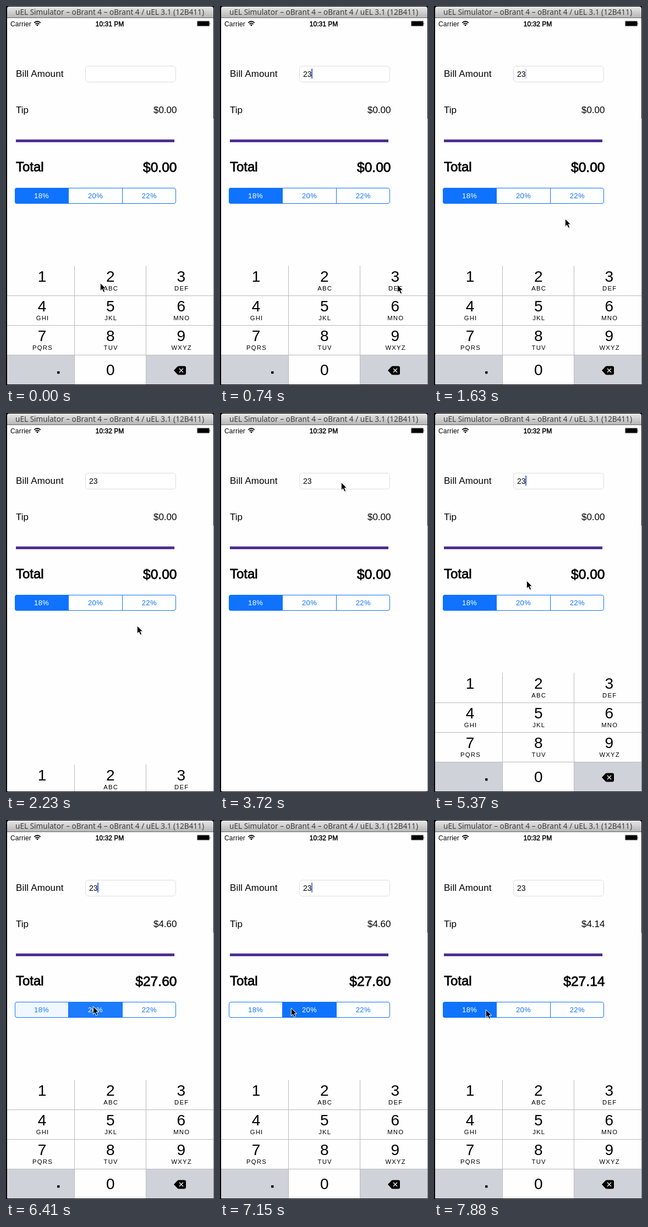
An HTML page for the animation above (8000 ms loop, 378 px wide and 690 px high).

```html
<!DOCTYPE html>
<html lang="en">
<head>
<meta charset="utf-8">
<title>Tip calculator</title>
<style>
html, body { margin: 0; width: 100%; height: 100%; overflow: hidden; background: #000; }
svg { display: block; width: 378px; height: 690px; font-family: "Liberation Sans", Arial, sans-serif; }
.mid { text-anchor: middle; }
.end { text-anchor: end; }
.label { font-size: 17px; }
.total { font-size: 24.6px; stroke: #000; stroke-width: .8px; }
.seg { font-size: 13px; letter-spacing: .4px; }
.digit { font-size: 28px; }
.abc { font-size: 11.3px; letter-spacing: 1.2px; }
</style>
</head>
<body>
<svg viewBox="0 0 378 690">
  <defs>
    <linearGradient id="bar" x2="0" y2="1">
      <stop stop-color="#e8e8e8"/><stop offset="1" stop-color="#b4b4b4"/>
    </linearGradient>
    <clipPath id="screen"><path d="M2 21H377V687Q377 689 375 689H4Q2 689 2 687Z"/></clipPath>
    <clipPath id="pill"><rect x="16" y="331" width="293" height="29" rx="4"/></clipPath>
  </defs>
  <rect x="377" y="205" width="1" height="485" fill="#777"/>
  <path d="M2 22V5Q2 1 6 1H373Q377 1 377 5V22Z" fill="url(#bar)"/>
  <text x="188.5" y="16" class="mid" fill="#3c3c3c" style="font:13.6px 'Noto Sans','Open Sans',sans-serif">uEL Simulator – oBrant 4 – oBrant 4 / uEL 3.1 (12B411)</text>

  <g clip-path="url(#screen)">
    <rect y="22" width="378" height="668" fill="#fefefe"/>
    <path d="M2 21.5H377" stroke="#666"/>
    <text x="8" y="37" font-size="12" letter-spacing=".2">Carrier</text>
    <g fill="none" stroke="#000" stroke-width="1.8">
      <path d="M51.2 30.6Q57 25.4 62.8 30.6M53.4 33Q57 29.8 60.6 33"/>
      <path d="M55 34.4Q57 32.8 59 34.4L57 36.7Z" fill="#000" stroke="none"/>
    </g>
    <text id="clock" x="188.5" y="37" class="mid" font-size="12" stroke="#000" stroke-width=".45"></text>
    <rect x="347.3" y="27.3" width="22.4" height="9.4" rx="1.5" fill="none" stroke="#000" stroke-width=".5"/>
    <rect x="348" y="28" width="21" height="8" rx=".5"/>
    <path d="M370.3 30.3Q372 32.2 370.3 34.3Z"/>

    <text x="18" y="128.7" class="label" letter-spacing=".15">Bill Amount</text>
    <rect x="144.5" y="109.5" width="164" height="29" rx="5" fill="#fff" stroke="#dcdcdc"/>
    <text id="bill" x="151" y="129" font-size="14"></text>
    <rect id="caret" y="114" width="2" height="18" fill="#4468e8"/>
    <text x="18" y="195" class="label">Tip</text>
    <text id="tip" x="310.5" y="195" class="label end"></text>
    <rect x="18" y="243" width="288" height="5" fill="#4e2f90"/>
    <text x="18" y="301" class="total" style="font-size:24px">Total</text>
    <text id="total" x="310.5" y="302" class="total end"></text>

    <g id="segments" clip-path="url(#pill)"></g>
    <path d="M113.5 331V360M211.5 331V360" stroke="#0f73ff"/>
    <rect x="16.5" y="331.5" width="292" height="28" rx="3.5" fill="none" stroke="#0f73ff"/>

    <g id="pad"></g>
  </g>
  <g id="cursor">
    <path d="M1 2V16L4.2 13L6.6 18.4L9.2 17.3L6.8 12H11Z" opacity=".2"/>
    <path d="M.3 .3V14.6L3.6 11.6L5.9 17L8.6 15.8L6.3 10.6H10.6Z" stroke="#fff"/>
  </g>
</svg>
<script>
const $ = id => document.getElementById(id);
const LOOP = 8000, TICK = 148.8, BLUE = '#0f73ff', GREY = '#d0d2d9';
const LETTERS = ['', 'ABC', 'DEF', 'GHI', 'JKL', 'MNO', 'PQRS', 'TUV', 'WXYZ'];
const COLUMNS = [[2, 122.5, 65.5], [125, 129, 189.7], [255, 122, 318.2]];  // left, width, centre

// [tick, x, y] stops of the pointer
const PATH = [
  [0, 171, 504], [2, 171, 504], [3, 245, 510], [4, 320, 507], [5, 322, 507],
  [6, 302, 552], [7, 262, 455], [8, 238, 387], [15, 238, 387], [17, 242, 402],
  [20, 242, 402], [21, 240, 385], [23, 226, 225], [24, 215, 150], [25, 220, 126],
  [34, 220, 126], [35, 205, 190], [36, 168, 305], [37, 157, 334], [39, 157, 334],
  [41, 158, 339], [47, 158, 339], [49, 100, 345], [50, 94, 345]
];

function buildPad() {
  let html = '<rect x="2" y="473" width="375" height="217" fill="#fefefe"/>' +
    `<path d="M2 635h122.5v55H2zM254.5 635H377v55H254.5z" fill="${GREY}"/>`;
  LETTERS.forEach((abc, i) => {
    const [x, w, mid] = COLUMNS[i % 3], y = 473 + 54 * Math.floor(i / 3);
    html += `<rect id="key${i + 1}" x="${x}" y="${y}" width="${w}" height="54" fill="${GREY}" visibility="hidden"/>
      <text x="${mid}" y="${y + 29.4}" class="mid digit">${i + 1}</text>
      <text x="${mid + 1}" y="${y + 45}" class="mid abc">${abc}</text>`;
  });
  $('pad').innerHTML = html +
    `<path d="M124.5 473V690M254.5 473V690M2 527.5H377M2 581.5H377M2 635.5H377" stroke="#b9babd"/>
    <text x="189.7" y="672.4" class="mid digit">0</text><rect x="93" y="665" width="4.5" height="4.5" rx="1"/>
    <path d="M305 663.5L311 657Q312 655.5 314 655.5H324Q327 655.5 327 658.5V668.5Q327 671.5 324 671.5H314Q312 671.5 311 670Z"/>
    <path d="M315 660l7 7m0-7l-7 7" stroke="#fff" stroke-width="1.3"/>`;
}

function buildSegments() {
  $('segments').innerHTML = '<rect x="16" y="331" width="293" height="29" fill="#fff"/>' +
    [18, 20, 22].map((p, i) => `<rect id="fill${i}" x="${16 + 97.7 * i}" y="331" width="97.7" height="29" fill="${BLUE}"/>
      <text id="pct${i}" x="${64.7 + 97.8 * i}" y="350" class="mid seg">${p}%</text>`).join('');
}

const clamp = v => Math.max(0, Math.min(1, v));

function pointer(n) {
  const i = PATH.findIndex(p => p[0] > n);
  if (i < 0) return PATH[PATH.length - 1].slice(1);
  const [a, x, y] = PATH[i - 1], [b, u, v] = PATH[i], k = (n - a) / (b - a);
  return [x + (u - x) * k, y + (v - y) * k];
}

function caretOpacity(n) {
  if (n < 2 || (n >= 15 && n < 28)) return 0;
  if (n < 9) return 1;
  const period = 940, phase = n < 15 ? 1500 : 5060;
  const k = (n * TICK - phase) / period;
  return clamp((Math.abs(k - Math.round(k)) * period - 100) / 120);
}

// distance the keypad is pushed down
function padOffset(n) {
  if (n < 15 || n > 31) return 0;
  if (n < 18) return 217 - 50 * 0.17 ** (n - 15);
  return n < 28 ? 220 : 158 * 0.2 ** (n - 28);
}

// selection fade: touch tint, then cross-fade
const fadeIn = k => k < 0 ? 0 : [.15, .5, .94][k] ?? 1;
const fadeOut = k => k < 1 ? 1 : [1, .5, .06][k] ?? 0;

function render(n) {
  const text = n < 2 ? '' : n < 5 ? '2' : '23';
  const rate = n < 42 ? 0 : n < 51 ? .2 : .18, bill = 23;
  $('clock').textContent = n < 10 ? '10:31 PM' : '10:32 PM';
  $('bill').textContent = text;
  $('caret').setAttribute('x', 150.5 + 7.8 * text.length);
  $('caret').setAttribute('opacity', caretOpacity(n));
  $('tip').textContent = '$' + (bill * rate).toFixed(2);
  $('total').textContent = '$' + (rate ? bill * (1 + rate) : 0).toFixed(2);

  const first = n < 50;
  const levels = [first ? fadeOut(n - 41) : fadeIn(n - 50), first ? fadeIn(n - 41) : fadeOut(n - 50), 0];
  levels.forEach((v, i) => {
    $('fill' + i).setAttribute('opacity', v);
    $('pct' + i).style.fill = `color-mix(in srgb, #fff ${v * 100}%, ${BLUE})`;
  });

  $('key2').setAttribute('visibility', n === 1 ? 'visible' : 'hidden');
  $('key3').setAttribute('visibility', n === 4 ? 'visible' : 'hidden');
  $('pad').setAttribute('transform', `translate(0 ${padOffset(n)})`);
  $('cursor').setAttribute('transform', `translate(${pointer(n)})`);
}

buildPad();
buildSegments();
const start = performance.now();
function frame(now) {
  const t = Math.max(0, now - start) % LOOP;
  render(Math.floor((t + 8) / TICK));  // the screen refreshes in steps
  requestAnimationFrame(frame);
}
render(0);
requestAnimationFrame(frame);
</script>
</body>
</html>
```
